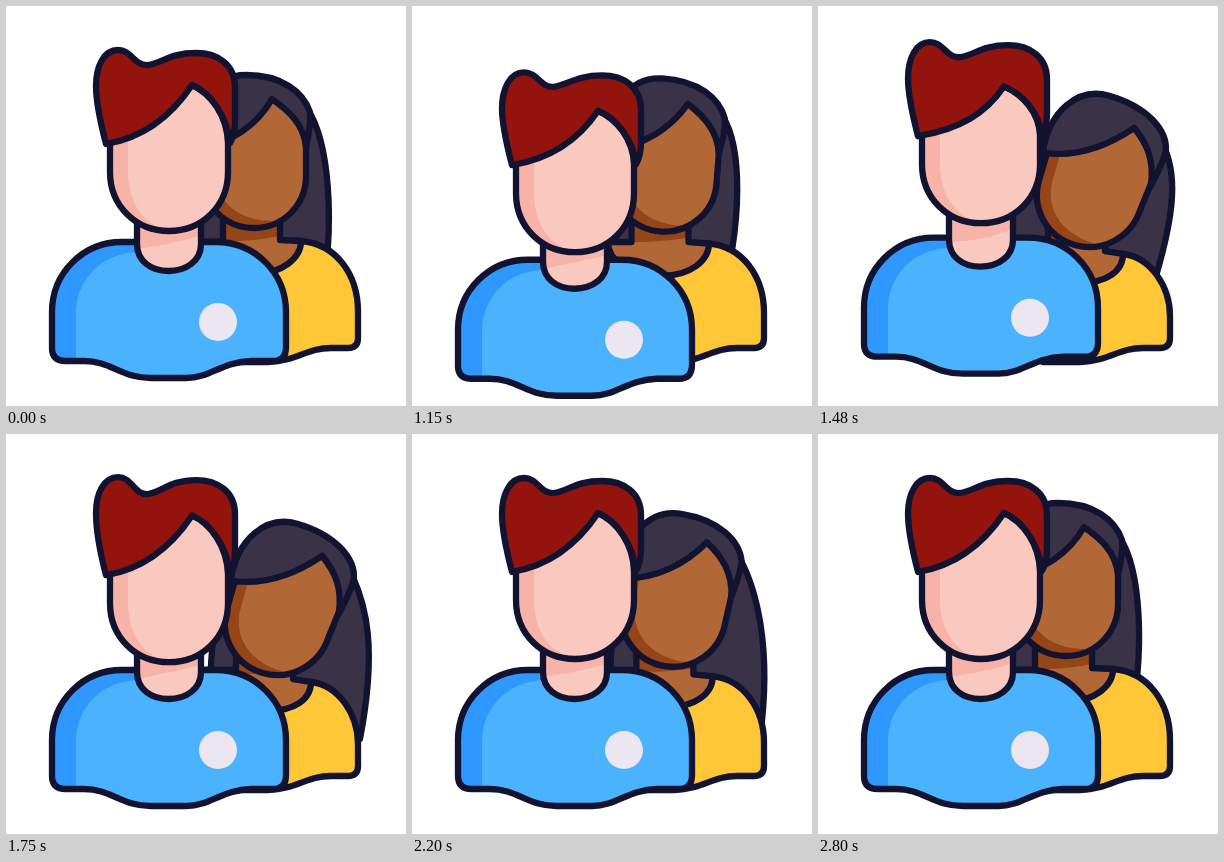
These frames come from a looping animation (400 by 400 pixels, 2830 ms). An HTML page with a canvas:

```html
<!DOCTYPE html>
<html>
<head>
<meta charset="utf-8">
<style>
html, body { margin: 0; height: 100%; overflow: hidden; background: #fff; }
canvas { display: block; }
</style>
</head>
<body>
<canvas id="stage" width="400" height="400"></canvas>
<script>
const ctx = document.getElementById('stage').getContext('2d');
const LOOP = 2830, START = 1030, STEP = 30;
const INK = '#121331', SKIN = '#f9c9c0', BLUSH = '#f7b3a7', BROWN = '#b26836', UMBER = '#964519';
const PLUM = '#3a3347', RED = '#92140c', BLUE = '#4bb3fd', DEEP = '#2f98ff', GOLD = '#ffc738';

// Key poses as [time, value], eased in and out
const tracks = {
  body: [[1000, 0], [1180, 19], [1440, -4.5], [1720, 0]],
  head: [[1020, 0], [1230, 31], [1560, -14], [1780, 4], [2000, 0]],
  quiff: [[1030, -2], [1300, 6], [1660, -6], [1900, 0]],
  parting: [[1030, 0], [1340, 14], [1700, -1], [1850, 0]],
  lean: [[1020, 0], [1470, 1], [1990, 1], [2450, 0]],
  tail: [[1030, 0], [1230, -10], [1750, 41], [2080, 41], [2600, -8], [3000, 0]]
};

function valueAt(keys, t) {
  if (t < START) return 0;
  const i = keys.findIndex(k => k[0] > t);
  if (i < 0) return keys[keys.length - 1][1];
  if (i === 0) return keys[0][1];
  const [t0, a] = keys[i - 1], [t1, b] = keys[i];
  return a + (b - a) * (1 - Math.cos(Math.PI * (t - t0) / (t1 - t0))) / 2;
}

function shape(d, fill, shade, shadeFill) {
  const path = new Path2D(d);
  ctx.fillStyle = fill;
  ctx.fill(path);
  if (shade) {
    ctx.save();
    ctx.clip(path);
    ctx.fillStyle = shadeFill;
    ctx.fill(new Path2D(shade));
    ctx.restore();
  }
  ctx.stroke(path);
}

function group(x, y, angle, paint) {
  ctx.save();
  ctx.translate(x, y);
  ctx.rotate(angle);
  paint();
  ctx.restore();
}

function woman(u, tail) {
  const angle = u * 16 * Math.PI / 180, cos = Math.cos(angle), sin = Math.sin(angle);
  const cx = 248 + 23 * u, cy = 170 + 19 * u, e = 7 * u;
  const onHead = (x, y) => [
    cx + (x - 248) * cos - (y - 170) * sin,
    cy + (x - 248) * sin + (y - 170) * cos
  ];

  // Long hair: the top follows the head, the end swings behind
  const [ax, ay] = onHead(302 + 0.8 * e, 104);
  const end = 313 + tail, bend = ax + 19 - 6 * u, left = 163 + tail;
  shape(`M${left},300 C${left},210 ${left},170 ${onHead(200, 110)} L${ax},${ay}
    C${bend},${ay + 29} ${(bend + end) / 2 + 15},212 ${end},305`, PLUM);

  const sx = 295 + 10 * u, sy = 13 * u, n = 13 * u, dip = 268 + 9 * u;
  shape(`M200,236 L${sx},${235 + sy} C${330 + 3 * u},${238 + sy} 352,${268 + sy} 352,${306 + 4 * u}
    V332 Q352,342 342,342 H325 C300,342 292,355 262,356 H225 Z`, GOLD);
  shape(`M${217 + n},200 V236 H196 C196,255 218,${dip} ${248 + n},${dip}
    C${276 + n},${dip} ${sx},${252 + sy} ${sx},${235 + sy} L${274 + n},${234 + 0.85 * sy} V200`, BROWN,
    `M200,190 H310 V${222 + 12 * u} C${275 + n},${231 + 9 * u} ${245 + n},${237 + 4 * u} 200,${235 + 4 * u} Z`, UMBER);

  group(cx, cy, angle, () => {
    ctx.translate(-248, -170);
    shape(`M196,140 L${266 + e},93 C${282 + e},104 ${298 + 0.5 * e},118 ${300 + 0.7 * e},138
      L${300 + 0.2 * e},170 C300,199 277,222 248,222 S196,199 196,170 Z`, BROWN,
      'M180,110 H209 V165 C209,195 232,216 270,215 L260,240 H180 Z', UMBER);
    shape(`M192,142 C186,100 208,69 240,69 C${276 + 0.5 * e},69 ${297 + 1.2 * e},86 ${304 + 0.8 * e},106
      C${305 + 0.8 * e},118 ${303 + 0.7 * e},128 ${300 + 0.7 * e},${141 + 0.5 * e}
      C${298 + 0.5 * e},118 ${282 + e},104 ${266 + e},93 C252,118 225,138 192,142 Z`, PLUM);
  });
}

function man(body, head, quiff, parting) {
  group(0, body, 0, () => {
    shape(`M46,306 C46,267 77,236 116,236 H210 C249,236 280,267 280,306 V341 Q280,355 267,355
      H245 C215,356 205,372 180,372 H145 C115,372 105,355 78,355 H60 Q46,355 46,342 Z`, BLUE,
      'M40,380 H70 V308 C70,274 95,247 132,246 V220 H40 Z', DEEP);
    const s = head - body;
    shape('M131,200 V238 C131,255 145,265 162.5,265 S195,255 195,238 V200', SKIN,
      `M120,190 H205 V${225 + s} C180,236 155,239 120,${245 + s} Z`, BLUSH);
    ctx.fillStyle = '#ebe6ef';
    ctx.beginPath();
    ctx.arc(212, 316, 19, 0, 7);
    ctx.fill();
  });
  group(0, head, 0, () => {
    const q = quiff, p = 79 + parting, side = 110 + parting / 2;
    shape(`M104,125 L186,${p} C205,${p + 8} 221,${side} 222,137 V166
      C222,200 196,225 163,225 S104,200 104,166 Z`, SKIN,
      'M95,100 H122 V166 C122,198 140,222 165,224 V240 H95 Z', BLUSH);
    shape(`M100,138 C94,115 90,${96 + q / 2} 90,${80 + q} C90,${60 + q} 98,${44 + q} 112,${44 + q}
      C126,${44 + q} 128,${60 + q / 2} 142,${59 + q / 2} C156,${57 + q / 2} 164,${47 + q} 190,${47 + q}
      C212,${47 + q} 229,${59 + q} 229,${81 + q} V115 C229,125 228,130 224,137
      C221,${side} 205,${p + 8} 186,${p} C168,${p + 27} 142,131 100,138 Z`, RED);
  });
}

function frame(now) {
  let t = now % LOOP;
  if (t >= START) t = START + Math.floor((t - START) / STEP) * STEP;
  const pose = {};
  for (const name in tracks) pose[name] = valueAt(tracks[name], t);

  ctx.fillStyle = '#fff';
  ctx.fillRect(0, 0, 400, 400);
  ctx.strokeStyle = INK;
  ctx.lineWidth = 6.3;
  ctx.lineCap = ctx.lineJoin = 'round';
  woman(pose.lean, pose.tail);
  man(pose.body, pose.head, pose.quiff, pose.parting);
}

const begin = performance.now();
function tick() {
  frame(performance.now() - begin);
  requestAnimationFrame(tick);
}
tick();
</script>
</body>
</html>
```
